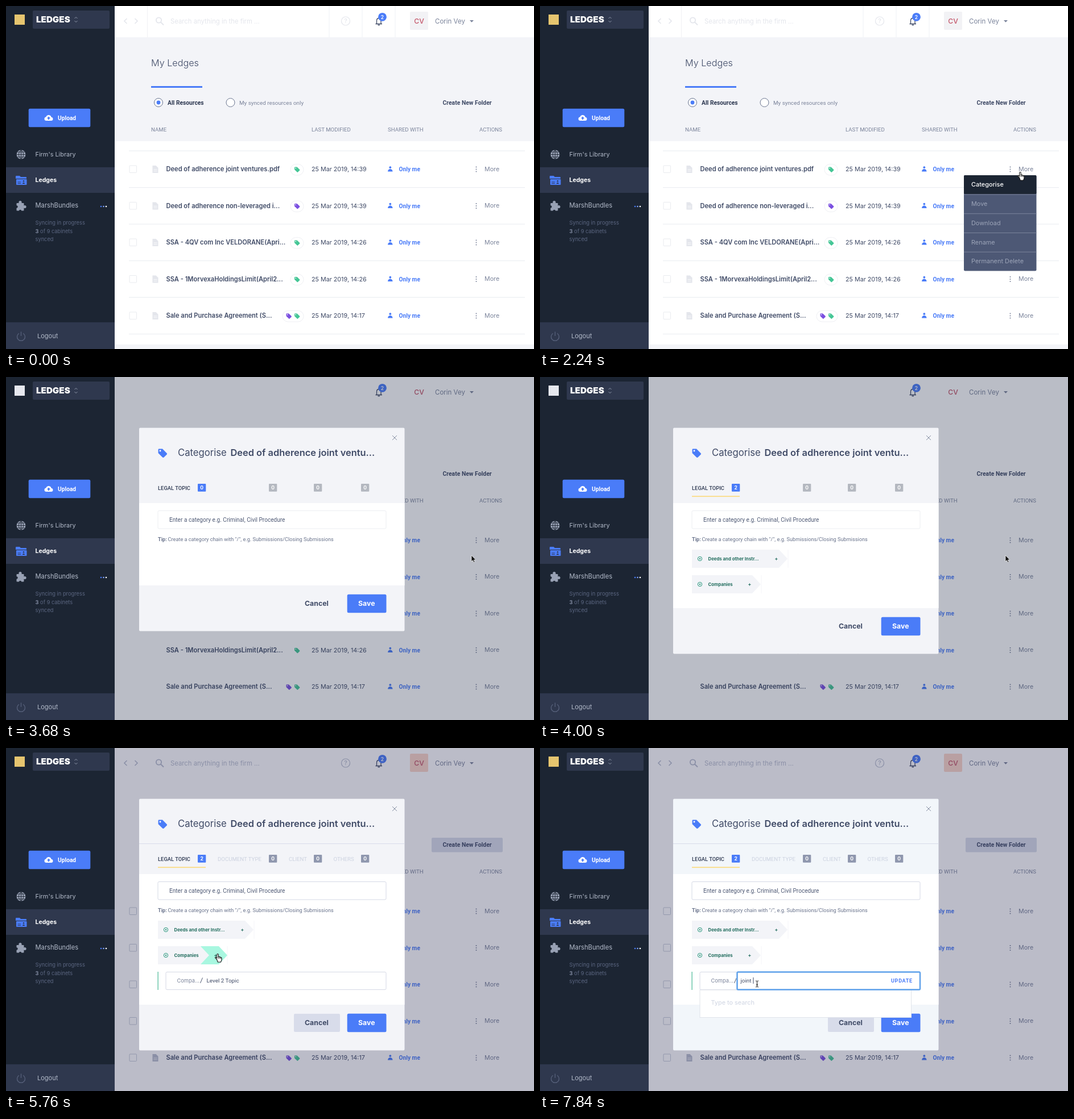
These frames come from a looping animation (928x604 px, 8 s). An HTML page:

```html
<!DOCTYPE html>
<html lang="en">
<head>
<meta charset="utf-8">
<title>Categorise a document</title>
<style>
html, body { margin: 0; width: 100%; height: 100%; overflow: hidden; background: #fff; }
svg { display: block; width: 100%; height: 100%; }
text { font-family: Inter, sans-serif; font-size: 11px; white-space: pre; }
.r { font-family: Roboto, sans-serif; }
.faint { --f: #e4e6ec; }
.sharp .faint { --f: #b7bdcd; }
.soft .faint { visibility: hidden; }
</style>
</head>
<body>
<svg id="stage" viewBox="0 0 928 604" preserveAspectRatio="none"></svg>
<script>
const BLUE = '#4a7cf8', INK = '#3f4a66', GREY = '#7b849b', DARK = '#1c2533', BAR = '#2f384e', PALE = '#f3f4f8';
const NAV = '#b2bac9', GREEN = '#45c696', PURPLE = '#7a4fe0';
const LOOP = 8000, STEP = 160;

const rect = (x, y, w, h, fill, more = '') => `<rect x="${x}" y="${y}" width="${w}" height="${h}" fill="${fill}" ${more}/>`;
const circle = (x, y, r, fill, more = '') => `<circle cx="${x}" cy="${y}" r="${r}" fill="${fill}" ${more}/>`;
const path = (d, fill, more = '') => `<path d="${d}" fill="${fill}" ${more}/>`;
const line = (d, color, w = 1, more = '') => path(d, 'none', `stroke="${color}" stroke-width="${w}" ${more}`);
const text = (x, y, s, size, color, weight = 400, more = '') =>
  `<text x="${x}" y="${y}" font-weight="${weight}" fill="${color}" style="font-size:${size}px" ${more}>${s}</text>`;
const rob = (x, y, s, size, color, weight = 400, more = '') => text(x, y, s, size, color, weight, `class="r" ${more}`);
const group = (id, body, more = '') => `<g id="${id}" ${more}>${body}</g>`;
const tag = (x, y, color, k = 1) =>
  `<g transform="translate(${x} ${y}) scale(${k})">${path('M-4.5-3.7Q-4.5-4.5-3.7-4.5H0L4.6.1Q5.2.8 4.6 1.5L1.5 4.6Q.8 5.2.1 4.6L-4.5 0Z', color)}${circle(-2.4, -2.4, .9, '#fff')}</g>`;

function sidebar() {
  const globe = circle(26.5, 261.5, 8, '#98a1b4') +
    line('M18.5 261.5H34.5M20 257H33M20 266H33M26.5 253.5V269.5M26.5 253.5C21 258 21 265 26.5 269.5C32 265 32 258 26.5 253.5', DARK, .9);
  const folder = path('M17 300Q17 299 18 299H24L26 301H35Q36 301 36 302V304H17Z', BLUE) + rect(18, 305, 18.5, 10, BLUE, 'rx="1"') +
    line('M20.5 310H26M20.5 312.5H26', BAR, .9) + circle(31, 308.3, 1.2, BAR) + path('M28.7 313Q31 308.5 33.3 313Z', BAR);
  const puzzle = rect(18.5, 347, 13, 13.5, '#98a1b4', 'rx="1"') + circle(25, 345.7, 2.6, '#98a1b4') +
    circle(33, 353.5, 2.6, '#98a1b4') + circle(18.5, 353.5, 2.2, DARK) + circle(25, 361, 2.2, DARK);
  const cloud = path('M71 202Q67.500 202 67.500 198.800Q67.500 196 70.300 195.600Q71.400 192 75 192Q78.600 192 79.600 195.700Q82.500 196 82.500 199Q82.500 202 79.300 202Z', '#fff') +
    path('M75 194.500L78 198H76.200V200H73.800V198H72Z', BLUE);
  return rect(0, 0, 191, 604, DARK) + rect(47, 8, 135, 32, BAR, 'rx="2"') +
    rect(15, 15, 18, 18, '#e6c56f', 'id="mark"') +
    text(53, 29, 'LEDGES', 15.2, '#fff', 900) + line('M120.500 22L123 19.500L125.500 22M120.500 26L123 28.500L125.500 26', '#8f98ac') +
    rect(39.7, 180.7, 108.6, 32.6, BLUE, 'rx="2.5"') + cloud + rob(91, 200.7, 'Upload', 10.2, '#fff', 700) +
    globe + text(51.5, 265, 'Firm\'s Library', 10.9, NAV) +
    rect(0, 284, 191, 45, BAR) + folder + text(51.5, 310, 'Ledges', 10.5, '#fff', 700) +
    puzzle + text(51.5, 355.3, 'MarshBundles', 11.2, NAV) +
    circle(167, 353, 1.3, BLUE) + circle(171.5, 353, 1.3, '#7fa2fa') + circle(176, 353, 1.3, '#fff') +
    text(51.5, 385, 'Syncing in progress', 9.3, '#5b6681') +
    text(51.5, 399.5, '<tspan font-weight="700" fill="#8089a0">3</tspan> of 9 cabinets', 9.25, '#5b6681') +
    text(51.5, 414, 'synced', 9.3, '#5b6681') +
    rect(0, 557, 191, 47, BAR) +
    line('M22.800 576.500A7 7 0 1 0 30.200 576.500M26.500 573.500V581', '#56607a', 1.3) + text(55, 585, 'Logout', 11, NAV);
}

function header() {
  const faint = line('M212.500 22L208 26.500L212.500 31M226.500 22L231 26.500L226.500 31', 'var(--f)', 1.6) +
    circle(268.500, 25, 4.600, 'none', 'stroke="var(--f)" stroke-width="1.8"') + line('M272 28.500L277 33.500', 'var(--f)', 2) +
    text(289, 30.5, 'Search anything in the firm ...', 11.3, 'var(--f)') +
    circle(597, 26.5, 7.5, 'none', 'stroke="var(--f)" stroke-width="1.2"') +
    text(597, 30.3, '?', 10.5, 'var(--f)', 500, 'text-anchor="middle"');
  return `<g class="faint">${faint}</g>` +
    line('M649.500 31.500H661M651.500 31.500V26Q651.500 21.500 655.200 21.500Q659 21.500 659 26V31.500M653.500 33.500H657', INK, 1.3) +
    circle(661.5, 19.3, 7.4, BLUE) + text(661.5, 22.5, '2', 8.5, '#fff', 600, 'text-anchor="middle"') +
    rect(710, 10, 32, 32, '#f2f2f5', 'id="avatar" rx="2"') + text(726, 30.8, 'CV', 12.2, '#c4566a', 500, 'text-anchor="middle"') +
    text(754, 30.7, 'Corin Vey', 11.5, GREY) + path('M815 25H822L818.500 28.800Z', GREY);
}

const FILES = [
  ['Deed of adherence joint ventures.pdf', '14:39', [GREEN]],
  ['Deed of adherence non-leveraged i...', '14:39', [PURPLE]],
  ['SSA - 4QV com Inc VELDORANE(Apri...', '14:26', [GREEN]],
  ['SSA - 1MorvexaHoldingsLimit(April2...', '14:26', [GREEN]],
  ['Sale and Purchase Agreement (S...', '14:17', [PURPLE, GREEN]]
];

function row([name, hour, tags], i) {
  const y = 287 + 64.5 * i, n = tags.length;
  const person = circle(675.3, y - 2.8, 1.9, BLUE) + path(`M671 ${y + 4.5}Q671.500 ${y} 675.300 ${y}Q679 ${y} 679.600 ${y + 4.5}Z`, BLUE);
  const doc = path(`M257.500 ${y - 6}H263.500L267.500 ${y - 2}V${y + 7}H257.500Z`, 'var(--f)') +
    line(`M259.500 ${y + 1}H265.500M259.500 ${y + 3.800}H265.500`, '#fff', .8);
  const pill = n > 1 ? [486, 37] : [500, 23];
  return `<g class="faint">${rect(217, y - 6, 12.5, 12.5, 'none', 'rx="1" stroke="var(--f)" stroke-opacity=".8"')}${doc}</g>` +
    text(281.5, y + 4, name, 11.1, INK, 600) +
    `<g class="bright">${rect(pill[0], y - 8.5, pill[1], 19.5, '#fff', 'rx="9.7" stroke="#eff0f4"')}</g>` +
    tags.map((c, k) => tag(511.5 - 14.5 * (n - 1 - k), y + 1, c)).join('') +
    text(537, y + 4.4, `25 Mar 2019, ${hour}`, 10.75, INK) + person + rob(690.5, y + 4, 'Only me', 10.2, BLUE, 700) +
    [-4, 0, 4].map(d => circle(826.5, y + .5 + d, 1, GREY)).join('') + text(841, y + 3.8, 'More', 10.7, GREY);
}

function page() {
  const lines = Array.from({ length: 6 }, (_, i) => rect(216, 254.5 + 64.5 * i, 696, 1.2, '#eceef2')).join('');
  const flat = rect(191, 55, 737, 183, PALE) + rect(191, 596, 737, 8, PALE) +
    [248, 567.5, 625.5, 683.5].map(x => rect(x, 0, 1, 55, '#f0f1f5')).join('') + lines;
  const head = [['NAME', 255], ['LAST MODIFIED', 537], ['SHARED WITH', 671], ['ACTIONS', 832]];
  return rect(191, 0, 737, 604, '#fff') + `<g class="bright">${flat}</g>` + header() +
    text(255, 106, 'My Ledges', 16.2, INK, 300) + rect(255, 141, 90, 3, BLUE) +
    circle(268, 170, 7.5, '#fff', 'stroke="#6a758f"') + circle(268, 170, 3.4, BLUE) +
    rob(284, 173.7, 'All Resources', 10.25, '#2c3750', 700) +
    circle(394.5, 170, 7.5, '#fff', 'stroke="#6a758f"') + rob(410, 173.7, 'My synced resources only', 9.85, GREY) +
    rect(748, 158, 125, 25.5, '#d9ddea', 'id="folderBtn" rx="2"') + rob(767.5, 174, 'Create New Folder', 10.4, INK, 700) +
    head.map(([s, x]) => rob(x, 221.4, s, 9.65, GREY)).join('') + FILES.map(row).join('');
}

function menu() {
  const items = ['Categorise', 'Move', 'Download', 'Rename', 'Permanent Delete'];
  return rect(745, 298, 127.5, 168.5, '#4d5875', 'rx="2"') + rect(745, 298, 127.5, 33.3, DARK, 'rx="2"') +
    items.map((s, i) => (i ? rect(745, 297.7 + 33.75 * i, 127.5, 1, '#7b849c') : '') +
      text(758, 318.3 + 33.75 * i, s, 10.9, i ? '#9ca4b8' : '#fff', i ? 400 : 500)).join('');
}

function chip(y, end, label, plus) {
  return path(`M267 ${y - 16}H${end - 16}L${end - 1} ${y}L${end - 16} ${y + 16}H267Z`, PALE) + rect(end - .5, y - 16, 1, 32, '#f5f6f9') +
    circle(281, y, 3.7, 'none', 'stroke="#2f9a80" stroke-width="1"') + line(`M279.500 ${y - 1.5}L282.500 ${y + 1.5}M282.500 ${y - 1.5}L279.500 ${y + 1.5}`, '#2f9a80') +
    (plus ? path('M342 349H374L389 365L374 381H342L357 365Z', '#a8f7e0', 'id="hot"') : '') +
    text(295.5, y + 2.6, label, 7.8, '#256f60', 700) + text(end - 20.5, y + 3, '+', 8.5, '#256f60', 700, 'text-anchor="middle"');
}

function dialog() {
  const badge = (x, id) => rect(x, 188, 14.3, 13.7, id ? BLUE : 'var(--badge)', 'rx="1"') +
    text(x + 7.2, 198, '0', 8.5, '#fff', 700, `text-anchor="middle" ${id}`);
  const tabs = [['DOCUMENT TYPE', 372], ['CLIENT', 497], ['OTHERS', 575.5]];
  const field = rect(267, 235.5, 401, 31.5, '#fff', 'rx="2" stroke="var(--edge)"');
  const level2 = rect(266.5, 394, 1.3, 32, '#56bf9f') + rect(281, 394.5, 387, 31, '#fff', 'rx="2" stroke="var(--edge)"') +
    text(300.5, 413, 'Compa...', 9.3, '#7b849b') + line('M341.500 414L345.500 404.500', '#4d5872') +
    group('typing', rect(281, 426, 371.5, 48.5, '#fff', 'stroke="#dfe3ea"') + text(300.5, 452.3, 'Type to search', 10.8, '#d5dae6', 500) +
      rect(346.5, 394.5, 321.5, 31, '#fff', 'rx="2" stroke="#9cc5f3" stroke-width="3"') +
      rect(346.5, 394.5, 321.5, 31, 'none', 'rx="1.5" stroke="#559be8" stroke-width="1.5"') +
      rob(617, 412.5, 'UPDATE', 9, BLUE, 700, 'letter-spacing=".7"')) +
    rob(352.5, 413.2, '', 9.85, INK, 400, 'id="entry"') + rect(375.5, 404, 1, 11, INK, 'id="caret"');
  return rect(234, 89.5, 466.5, 443, PALE, 'id="panel" rx="2"') + rect(234, 222, 466.5, 100, '#fff', 'id="body"') +
    group('foot', rect(506, 16, 81, 32, '#d8dcea', 'id="cancel" rx="2"') + rect(599.7, 15.7, 68.8, 32.6, BLUE, 'rx="2.5"') +
      text(525, 36.1, 'Cancel', 12.3, INK, 700) + text(619, 36.1, 'Save', 12.3, '#fff', 700)) +
    line('M679 103L687 111M687 103L679 111', '#848da2') + tag(275, 134, BLUE, 1.65) +
    text(302, 139.3, 'Categorise', 16.7, INK) + text(394.5, 139.3, 'Deed of adherence joint ventu...', 16.4, INK, 600) +
    rob(267, 198.6, 'LEGAL TOPIC', 9.4, '#2c3750', 500) + badge(337, 'id="count"') + [462, 541, 624].map(x => badge(x, '')).join('') +
    group('tabs', rect(234, 168, 466.5, 1, '#d8dcea') + tabs.map(([s, x]) => rob(x, 198.6, s, 9.65, '#ccd2e0')).join('')) +
    field + rob(287, 254.7, 'Enter a category e.g. Criminal, Civil Procedure', 10.1, '#4f5a75') +
    rob(267, 288.6, 'Tip:', 9.1, '#69738c', 700) + rob(284.5, 288.6, 'Create a category chain with "/", e.g. Submissions/Closing Submissions', 9.2, '#69738c') +
    group('chips', rect(267, 209.3, 84, 1.8, '#fbdc85') + chip(320, 436, 'Deeds and other Instr...') + chip(365, 389, 'Companies', true)) +
    group('level2', level2);
}

function pointers() {
  const hand = path('M-1.300 9.500L-4.200 6.600Q-4.800 5.200-3.300 5.200L-1.300 6.800V.8Q-1.200-.5 0-.5T1.300.8V4.600Q2.700 3.900 3.300 5.100Q4.800 4.500 5.300 5.800Q7 5.500 7 7.200V10L5.600 14H.2Z', '#fff', 'stroke="#111" stroke-width="1.1"') +
    line('M1.300 5V8M3.300 5.400V8M5.300 6V8.300', '#111', .8);
  return group('hand', hand) +
    group('arrow', path('M0 0V11L2.500 8.800L4.200 12.500L6 11.700L4.400 8.100H7.700Z', '#111', 'stroke="#fff" stroke-width=".7"')) +
    group('beam', line('M-2.500-5.500Q0-5.500 0-4V4Q0 5.500-2.500 5.500M2.500-5.500Q0-5.500 0-4V4Q0 5.500 2.500 5.500M-1.500 1.500H1.500', '#111'));
}

const stage = document.getElementById('stage');
stage.innerHTML = page() + group('menu', menu()) +
  rect(191, 0, 737, 604, '#222c48', 'id="shade" opacity=".31"') + group('dialog', dialog()) + sidebar() + pointers();
const $ = id => document.getElementById(id);
const show = (id, on) => { $(id).style.display = on ? '' : 'none'; };
const brightParts = [...document.querySelectorAll('.bright')];

// Pointer glides: start, end, from and to.
const MOVES = [
  [160, 1280, 740, 530, 841, 294], [1280, 1600, 841, 294, 844, 293],
  [2400, 3040, 844, 293, 818, 314], [4160, 4480, 818, 314, 823, 315],
  [4640, 5120, 823, 315, 369, 362.5], [5120, 5440, 369, 362.5, 372, 363],
  [6080, 6560, 372, 363, 381.5, 415.5]
];

function pointerAt(t) {
  const m = MOVES.filter(v => t >= v[0]).pop() || MOVES[0];
  const p = Math.min(1, Math.max(0, (t - m[0]) / (m[1] - m[0])));
  const e = p * p * (3 - 2 * p);
  return [m[2] + (m[4] - m[2]) * e, m[3] + (m[5] - m[3]) * e];
}

function draw(ms) {
  const t = Math.floor(ms / STEP) * STEP;
  const open = t >= 3680, loaded = t >= 3840, sharp = t >= 5760, focus = t >= 6880;
  stage.setAttribute('class', sharp ? 'sharp' : open ? 'soft' : '');
  brightParts.forEach(p => { p.style.display = open ? 'none' : ''; });
  show('menu', t >= 1920 && !open);
  show('shade', open);
  show('dialog', open);
  show('folderBtn', sharp);
  show('avatar', sharp || !open);
  $('avatar').setAttribute('fill', sharp ? '#fbd6c8' : '#f2f2f5');
  $('mark').setAttribute('fill', open && !sharp ? '#e6e8ee' : '#e6c56f');
  $('shade').setAttribute('fill', sharp ? '#25294e' : '#222c48');

  const base = sharp ? 452 : loaded ? 407 : 367;
  $('panel').setAttribute('height', base + 80.5 - 89.5);
  $('panel').setAttribute('fill', focus ? '#f2f6fa' : PALE);
  $('body').setAttribute('height', base - 222);
  $('foot').setAttribute('transform', `translate(0 ${base})`);
  $('dialog').style.setProperty('--edge', sharp ? '#d5d9e5' : '#eceef2');
  $('dialog').style.setProperty('--badge', sharp ? '#8f97ae' : '#b4b8c0');
  $('count').textContent = loaded ? '2' : '0';
  show('chips', loaded);
  show('tabs', sharp);
  show('cancel', sharp);
  show('level2', sharp);
  show('hot', sharp && t < 6240);
  show('typing', focus);
  show('caret', focus);
  const typed = t >= 7360 ? 'joint '.slice(0, [2, 3, 5, 6][Math.min(3, (t - 7360) / STEP)]) : '';
  $('entry').textContent = focus ? typed : 'Level 2 Topic';
  if (focus) $('caret').setAttribute('x', 353 + (typed ? $('entry').getComputedTextLength() : 0));

  const [x, y] = pointerAt(t);
  const kind = !open ? (t < 1280 ? 'arrow' : 'hand') : t < 5120 ? 'arrow' : t < 6400 ? 'hand' : 'beam';
  for (const id of ['hand', 'arrow', 'beam']) {
    show(id, id === kind && t >= 320);
    $(id).setAttribute('transform', `translate(${x} ${y})`);
  }
}

const begin = performance.now();
function tick() {
  draw((performance.now() - begin) % LOOP);
  requestAnimationFrame(tick);
}
tick();
</script>
</body>
</html>
```
